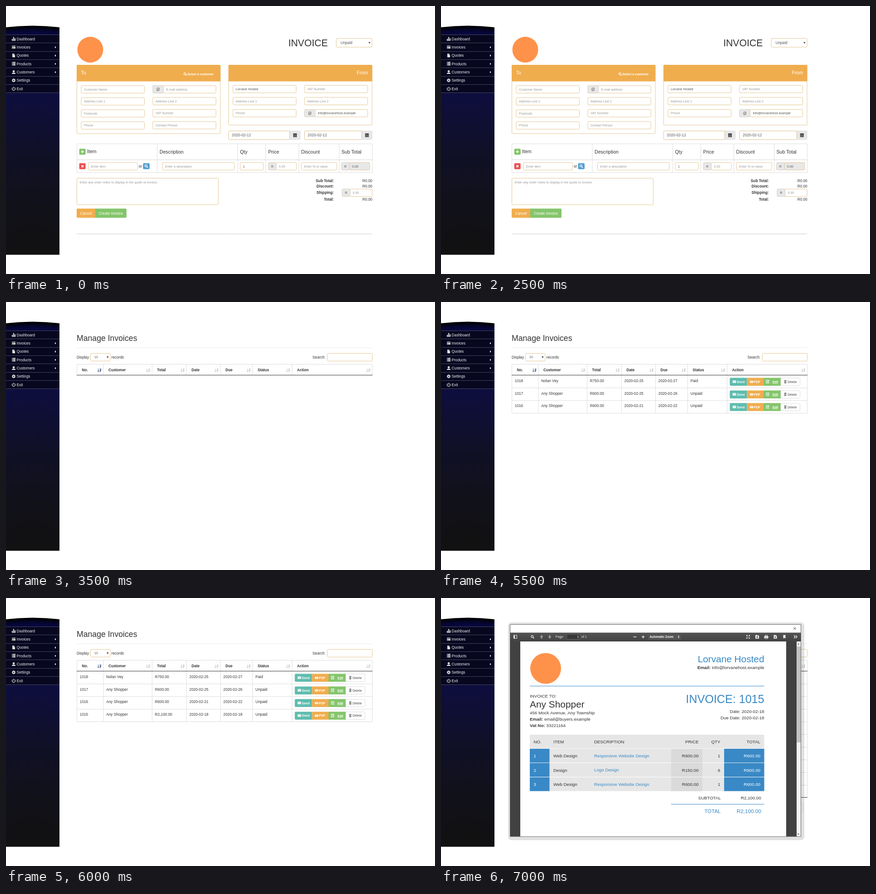
Write an HTML page with a canvas that moves like this. It is 947 px wide and 592 px high and loops after 8 s.

```html
<!DOCTYPE html>
<html lang="en">
<head>
<meta charset="utf-8">
<title>Invoice manager</title>
<style>
html, body { margin: 0; width: 100%; height: 100%; overflow: hidden; background: #fff; }
canvas { display: block; }
</style>
</head>
<body>
<canvas id="stage" width="947" height="592"></canvas>
<script>
const ctx = document.getElementById('stage').getContext('2d');
const LOOP = 8000;
const BODY = 8.24, SMALL = 7.06, HEAD = 10.6, DOC = 9.75;
const BLUE = '#3989c6';
const COMPANY = 'Lorvane Hosted', COMPANY_MAIL = 'info@lorvanehost.example';
const SHOPPER = 'Any Shopper', PERSON = 'Nolan Vey';

const light = {
  page: '#fff', text: '#333', value: '#555', hint: '#999', edge: '#e3c793', line: '#ddd',
  addon: '#e8e8e8', orange: '#f0ad4e', green: '#84c56b', red: '#ec5050', find: '#559fd0',
  logo: '#ff924a', white: '#fff'
};
const dim = {
  page: '#808080', text: '#1a1a1a', value: '#2b2b2b', hint: '#4a4a4a', edge: '#94825c', line: '#6d6d6d',
  addon: '#747474', orange: '#a87833', green: '#5b8a49', red: '#bb3a3a', find: '#2ba9bd',
  logo: '#bd6c3a', white: '#c4c4c4'
};
let pal = light;

function text(s, x, y, size = BODY, color = pal.text, align = 'left', weight = '') {
  ctx.font = `${weight} ${size}px "Liberation Sans", Arial, sans-serif`;
  ctx.fillStyle = color;
  ctx.textAlign = align;
  ctx.fillText(s, x, y + size * 0.355);
}

function rect(x1, y1, x2, y2, color) {
  ctx.fillStyle = color;
  ctx.fillRect(x1, y1, x2 - x1, y2 - y1);
}

function box(x1, y1, x2, y2, fill, edge, r = 2) {
  const inset = edge ? 0.5 : 0;
  ctx.beginPath();
  ctx.roundRect(x1 + inset, y1 + inset, x2 - x1 - 2 * inset, y2 - y1 - 2 * inset, r);
  if (fill) { ctx.fillStyle = fill; ctx.fill(); }
  if (edge) { ctx.strokeStyle = edge; ctx.lineWidth = 1; ctx.stroke(); }
}

function poly(color, ...p) {
  ctx.beginPath();
  for (let i = 0; i < p.length; i += 2) ctx.lineTo(p[i], p[i + 1]);
  ctx.fillStyle = color;
  ctx.fill();
}

function stroke(color, width, ...p) {
  ctx.beginPath();
  for (let i = 0; i < p.length; i += 2) ctx.lineTo(p[i], p[i + 1]);
  ctx.strokeStyle = color;
  ctx.lineWidth = width;
  ctx.stroke();
}

function disc(x, y, r, color) {
  ctx.beginPath();
  ctx.arc(x, y, r, 0, 7);
  ctx.fillStyle = color;
  ctx.fill();
}

function arc(x, y, r, color, width, from = 0, to = 7) {
  ctx.beginPath();
  ctx.arc(x, y, r, from, to);
  ctx.strokeStyle = color;
  ctx.lineWidth = width;
  ctx.stroke();
}

// Icons are drawn around their own centre, about 8 px wide.
const icons = {
  chart(c) { rect(-4, 0, -2, 4, c); rect(-1, -4, 1, 4, c); rect(2, -1, 4, 4, c); rect(-4, 3, 4, 4, c); },
  card(c) { rect(-4, -3, 4, -1.5, c); rect(-4, -0.3, 4, 3, c); rect(-3, 0.8, -1, 1.6, '#222'); },
  file(c) { poly(c, -3, -4, 0.5, -4, 0.5, -1, 3, -1, 3, 4, -3, 4); poly(c, 1, -4, 3, -1.6, 1, -1.6); },
  list(c) { for (let y = -4; y < 4; y += 2.1) { rect(-4, y, -2.8, y + 1.5, c); rect(-2.2, y, 4, y + 1.5, c); } },
  user(c) { disc(0, -1.7, 2.3, c); poly(c, -4, 4, -4, 2.5, -1, 1, 1, 1, 4, 2.5, 4, 4); },
  gear(c) {
    for (let i = 0; i < 8; i++) {
      const a = i * Math.PI / 4;
      stroke(c, 1.7, 2 * Math.cos(a), 2 * Math.sin(a), 4 * Math.cos(a), 4 * Math.sin(a));
    }
    arc(0, 0, 2.2, c, 1.7);
  },
  power(c) { arc(0, 0.3, 3.4, c, 1.2, -0.95, 4.1); stroke(c, 1.3, 0, -4, 0, 0); },
  search(c) { arc(-0.8, -0.8, 2.3, c, 1.3); stroke(c, 1.6, 0.9, 0.9, 3.5, 3.5); },
  calendar(c) {
    rect(-4, -4, 4, 4, c);
    for (let y = -1.6; y < 3; y += 1.9) rect(-3.4, y, 3.4, y + 0.5, pal.addon);
  },
  plus(c) { rect(-3.5, -1, 3.5, 1, c); rect(-1, -3.5, 1, 3.5, c); },
  cross(c) { stroke(c, 1.9, -2.5, -2.5, 2.5, 2.5); stroke(c, 1.9, -2.5, 2.5, 2.5, -2.5); },
  mail(c) { rect(-3.8, -2.8, 3.8, 2.8, c); stroke('#5fbcae', 0.8, -3.8, -2.6, 0, 0.8, 3.8, -2.6); },
  eye(c) {
    ctx.beginPath(); ctx.ellipse(0, 0, 4, 2.6, 0, 0, 7); ctx.fillStyle = c; ctx.fill();
    arc(0, -0.2, 1.6, '#f0ad4e', 0.7);
  },
  edit(c) { stroke(c, 1.1, 1, -3, -3, -3, -3, 3, 3, 3, 3, 0.5); stroke(c, 1.7, -0.8, 0.9, 3.5, -3.2); },
  trash(c) {
    rect(-3, -3.3, 3, -2.2, c); rect(-1, -4, 1, -3.3, c);
    for (const x of [-2.2, -0.5, 1.2]) rect(x, -1.6, x + 1, 3.4, c);
    rect(-2.5, 3, 2.5, 4, c);
  },
  sort(c) {
    rect(-3, -4, -1.8, 3, c); poly(c, -4.6, 1.3, -0.2, 1.3, -2.4, 4);
    rect(0.8, -4, 2, 4, c); rect(2, -4, 4.6, -2.8, c); rect(2, -1.8, 3.8, 0.2, c);
    poly(c, 1, 1, 4.6, -1, 2.6, 3);
  },
  panel(c) { box(-4, -4, 4, 4, null, c, 0); rect(-3, -3, -1, 3, c); },
  up(c) { poly(c, 0, -4, 4, 0, 1.5, 0, 1.5, 4, -1.5, 4, -1.5, 0, -4, 0); },
  down(c) { poly(c, 0, 4, 4, 0, 1.5, 0, 1.5, -4, -1.5, -4, -1.5, 0, -4, 0); },
  expand(c) {
    for (const sx of [-1, 1]) for (const sy of [-1, 1]) {
      poly(c, 4 * sx, 4 * sy, sx, 4 * sy, 4 * sx, sy);
      stroke(c, 1.2, sx, sy, 3 * sx, 3 * sy);
    }
  },
  folder(c) { rect(-4, -4, 0, -2, c); rect(-4, -3, 4, 4, c); poly('#444', 0, -1.5, 2.3, 1, 0.7, 1, 0.7, 3, -0.7, 3, -0.7, 1, -2.3, 1); },
  printer(c) { rect(-4.5, -1.5, 4.5, 3, c); box(-3, -4, 3, 0, null, c, 0); box(-3, 1, 3, 4.5, '#444', c, 0); },
  save(c) { poly(c, -3.5, -4, 1, -4, 3.5, -1.5, 3.5, 4, -3.5, 4); poly('#444', 0, 2.8, -2, 0.6, -0.6, 0.6, -0.6, -1.5, 0.6, -1.5, 0.6, 0.6, 2, 0.6); },
  mark(c) { poly(c, -2.5, -4, 2.5, -4, 2.5, 4, 0, 2, -2.5, 4); }
};

function icon(name, x, y, color, scale = 1) {
  ctx.save();
  ctx.translate(x, y);
  ctx.scale(scale, scale);
  icons[name](color);
  ctx.restore();
}

function sidebar() {
  ctx.save();
  ctx.beginPath();
  ctx.moveTo(0, 47);
  ctx.quadraticCurveTo(59, 40, 118, 47);
  ctx.lineTo(118, 549.5);
  ctx.lineTo(0, 549.5);
  ctx.clip();
  const glow = ctx.createRadialGradient(59, 560, 0, 59, 560, 520);
  [[0, '#111'], [0.1, '#111113'], [0.25, '#11111b'], [0.45, '#101026'], [0.72, '#0e0e40'], [0.95, '#0a0a4c'], [0.975, '#05052c'], [0.99, '#000']]
    .forEach(([at, color]) => glow.addColorStop(at, color));
  rect(0, 40, 118, 550, glow);
  rect(0, 63, 118, 192, '#070720');
  ctx.restore();
  const items = [['chart', 'Dashboard'], ['card', 'Invoices'], ['file', 'Quotes'], ['list', 'Products'],
    ['user', 'Customers'], ['gear', 'Settings'], ['power', 'Exit']];
  items.forEach(([name, label], i) => {
    const y = 72.8 + i * 18.35;
    rect(0, Math.round(y - 9.8), 118, Math.round(y - 9.8) + 1, '#45455c');
    icon(name, 17, y - 0.3, '#e4e4e4');
    text(label, 23.6, y, BODY, '#f2f2f2');
    if (i > 0 && i < 5) poly('#fff', 108, y - 2.4, 110.6, y, 108, y + 2.4);
  });
  rect(0, 191, 118, 192, '#45455c');
}

function field(x1, y1, x2, label, { h = 17.5, size = SMALL, color = pal.hint, fill = pal.page, pad = 6.5 } = {}) {
  box(x1, y1, x2, y1 + h, fill, pal.edge);
  text(label, x1 + pad, y1 + h / 2, size, color);
}

function addonField(x1, split, x2, y, sign, label, options = {}) {
  field(split - 1, y, x2, label, options);
  box(x1, y, split, y + 17.5, pal.addon, pal.line === '#ddd' ? '#d6cdbb' : pal.line);
  text(sign, (x1 + split) / 2, y + 9, sign === '@' ? BODY : SMALL, pal.value, 'center');
}

function select(x1, y1, x2, h, label, size, pad) {
  field(x1, y1, x2, label, { h, size, color: pal.value, pad });
  poly(pal.text, x2 - 8.3, y1 + h / 2 - 1.6, x2 - 4, y1 + h / 2 - 1.6, x2 - 6.1, y1 + h / 2 + 2);
}

function dateField(x1, split, x2) {
  box(x1, 275.5, x2, 295.5, pal.addon, pal.line);
  field(x1, 275.5, split + 0.5, '2020-02-12', { h: 20, size: BODY, color: pal.value, pad: 7.6 });
  icon('calendar', (split + x2) / 2, 285.5, pal.text);
}

function iconButton(name, x, y, w, color) {
  box(x, y, x + w, y + 13.2, color);
  icon(name, x + w / 2, y + 6.6, pal.white, name === 'search' ? 1 : 0.9);
}

function invoiceForm() {
  disc(186, 96.5, 28.5, pal.logo);
  text('INVOICE', 710.3, 81, 21.2, pal.text, 'right');
  select(728.5, 71, 808.5, 20.5, 'Unpaid', BODY, 10);

  box(156, 130, 473.5, 282.5, pal.page, pal.edge);
  box(491, 130, 808.5, 263.5, pal.page, pal.edge);
  box(156, 130, 473.5, 166.5, pal.orange, null, [2, 2, 0, 0]);
  box(491, 130, 808.5, 166.5, pal.orange, null, [2, 2, 0, 0]);
  text('To', 165.6, 147.5, HEAD, pal.white);
  text('From', 799, 147.5, HEAD, pal.white, 'right');
  icon('search', 395.5, 150.5, pal.white, 0.95);
  text('Select a customer', 400.3, 150.8, 6.8, pal.white, 'left', 'bold');

  ['Customer Name', 'Address Line 1', 'Postcode', 'Phone'].forEach((s, i) => field(165.5, 175.4 + i * 26.6, 306, s));
  addonField(323.5, 348, 464, 175.4, '@', 'E-mail address');
  ['Address Line 2', 'VAT Number', 'Contact Person'].forEach((s, i) => field(323.5, 201.5 + i * 26.6, 464, s));
  field(500.5, 174.8, 641, COMPANY, { color: pal.value });
  field(500.5, 201.4, 641, 'Address Line 1');
  field(500.5, 228, 641, 'Phone');
  field(658.5, 174.8, 799, 'VAT Number');
  field(658.5, 201.4, 799, 'Address Line 2');
  addonField(658.5, 683, 799, 228, '@', COMPANY_MAIL, { color: pal.value });

  dateField(491, 626, 650);
  dateField(658.5, 785, 808.5);

  box(156, 304, 809, 368.5, null, pal.line, 0);
  rect(156, 339, 809, 340.3, pal.line);
  [334, 511.5, 573.5, 646.5, 735.5].forEach(x => rect(x - 0.5, 304, x + 0.5, 368, pal.line));
  [['Item', 179, 321], ['Description', 339], ['Qty', 516.5], ['Price', 578.7], ['Discount', 651.5], ['Sub Total', 740.5]]
    .forEach(([s, x, y = 322.5]) => text(s, x, y, HEAD));
  iconButton('plus', 161.7, 315.2, 14, pal.green);
  iconButton('cross', 161.7, 347.2, 14, pal.red);
  iconButton('search', 302.5, 347.2, 14.5, pal.find);
  const y = 345.3;
  field(181.3, y, 291, 'Enter item');
  text('or', 293, 353.7);
  field(345, y, 504.5, 'Enter a description');
  field(516.5, y, 568.8, '1', { color: pal.value });
  addonField(578.7, 597, 641.5, y, 'R', '0.00');
  field(651.5, y, 730.7, 'Enter % or value');
  addonField(740.3, 758.5, 803.5, y, 'R', '0.00', { color: pal.value, fill: pal.addon });

  box(156, 379.8, 469, 439.5, pal.page, pal.edge);
  text('Enter any order notes to display in the quote or invoice.', 162.7, 389, SMALL, pal.hint);

  [['Sub Total:', 386], ['Discount:', 398], ['Shipping:', 412.3], ['Total:', 427.5]].forEach(([s, ty]) => {
    text(s, 723.5, ty, BODY, pal.text, 'right', 'bold');
    if (s !== 'Shipping:') text('R0.00', 808.7, ty, BODY, pal.text, 'right');
  });
  addonField(741.5, 760, 808.8, 403.8, 'R', '0.00');

  box(156, 447.5, 197, 467.8, pal.orange, null, [2, 0, 0, 2]);
  box(197, 447.5, 266, 467.8, pal.green, null, [0, 2, 2, 0]);
  text('Cancel', 176.6, 457.8, BODY, pal.white, 'center');
  text('Create Invoice', 231.2, 457.8, BODY, pal.white, 'center');

  stroke(pal.line === '#ddd' ? '#ccc' : '#666', 1, 156, 501.5, 158, 503.5, 806.5, 503.5, 808.5, 501.5);
}

function customerDialog() {
  box(286, 50.5, 661.5, 287, 'rgba(0,0,0,.07)', null, 12);
  ctx.save();
  ctx.shadowColor = 'rgba(0,0,0,.5)';
  ctx.shadowBlur = 9;
  ctx.shadowOffsetY = 3;
  box(296, 58, 651, 273.5, '#fff', null, 3);
  ctx.restore();
  box(296, 58, 651, 273.5, null, '#666', 3);
  text('Select a customer', 305.5, 74.7, HEAD);
  text('×', 638, 73, 12.4, '#bbb', 'center', 'bold');
  rect(297, 91, 650, 92, '#e5e5e5');
  rect(297, 235, 650, 236, '#e5e5e5');
  text('Search:', 537.5, 109.3, BODY, pal.text, 'right');
  field(542, 100.5, 642, '', { h: 18 });

  box(305, 125, 642, 206, null, pal.line, 0);
  rect(422, 125, 423, 206, pal.line);
  rect(537, 125, 538, 206, pal.line);
  rect(305, 177.5, 642, 178.5, pal.line);
  rect(305, 149, 642, 150, '#222');
  rect(305, 205, 642, 206, '#222');
  [['Name', 316.8, 414], ['Contact', 433.8, 528.5], ['Action', 548, 632.5]].forEach(([s, x, sx], i) => {
    text(s, x, 137.7, BODY, pal.text, 'left', 'bold');
    icon('sort', sx, 138.5, i === 1 ? '#55708c' : '#ccc');
  });
  [SHOPPER, PERSON].forEach((name, i) => {
    const y = 161 + i * 28;
    text(name, 311.8, y);
    box(543.3, y - 6, 635, y + 12, pal.orange);
    text('Select', 589.2, y + 3, SMALL, '#fff', 'center', 'bold');
  });
  text('Showing 1 to 2 of 2 entries', 305.3, 220.5);
  box(600, 244.5, 641.7, 264.8, '#ddd');
  text('Cancel', 621, 254.8, BODY, pal.text, 'center');
}

const columns = [156.5, 215, 322.5, 398.5, 473.5, 544.5, 631.5, 808.5];
const invoices = [
  ['1018', PERSON, 'R750.00', '2020-02-25', '2020-02-27', 'Paid'],
  ['1017', SHOPPER, 'R600.00', '2020-02-25', '2020-02-26', 'Unpaid'],
  ['1016', SHOPPER, 'R600.00', '2020-02-21', '2020-02-22', 'Unpaid'],
  ['1015', SHOPPER, 'R2,100.00', '2020-02-18', '2020-02-18', 'Unpaid'],
  ['1014', PERSON, 'R1,200.00', '2020-02-17', '2020-02-12', 'Unpaid']
];

function invoiceRow(cells, y) {
  columns.forEach(x => rect(x - 0.5, y, x + 0.5, y + 28, pal.line));
  rect(156, y + 27.3, 809, y + 28.3, pal.line);
  cells.forEach((s, i) => text(s, columns[i] + 6.3, y + 11.7));
  const top = y + 5.5, bottom = y + 23, mid = y + 14.2;
  box(637.5, top, 675.5, bottom, '#5fbcae', null, [2, 0, 0, 2]);
  rect(675.5, top, 712, bottom, pal.orange);
  rect(712, top, 750, bottom, pal.green);
  box(749.5, top, 793, bottom, '#fff', '#ddd');
  icon('mail', 647.5, mid - 0.3, '#fff');
  text('Send', 653, mid, SMALL, '#fff', 'left', 'bold');
  icon('eye', 685.5, mid, '#fff');
  text('PDF', 690.8, mid, SMALL, '#fff', 'left', 'bold');
  icon('edit', 721, mid - 0.3, '#fff');
  text('Edit', 731.8, mid + 0.6, 6.6, '#fff', 'left', 'bold');
  rect(731.8, mid + 3.7, 744, mid + 4.3, '#fff');
  icon('trash', 760, mid - 0.3, '#555', 0.9);
  text('Delete', 765, mid, SMALL, '#444');
}

function invoiceList(count) {
  text('Manage Invoices', 156, 79.3, 17.66);
  rect(156, 100.5, 808.5, 101.5, '#e9e9e9');
  text('Display', 156, 121.7);
  select(186, 113, 230.5, 17.8, '10', SMALL, 9);
  text('records', 232.7, 121.7);
  text('Search:', 705, 121.7, BODY, pal.text, 'right');
  field(709, 113, 809, '', { h: 18 });
  rect(156, 137, 809, 138, pal.line);
  columns.forEach(x => rect(x - 0.5, 137, x + 0.5, 162, pal.line));
  ['No.', 'Customer', 'Total', 'Date', 'Due', 'Status', 'Action'].forEach((s, i) => {
    text(s, columns[i] + 11, 150, BODY, pal.text, 'left', 'bold');
    icon('sort', columns[i + 1] - 8.8, 151, i ? '#ccc' : '#55708c');
  });
  invoices.slice(0, count).forEach((cells, i) => invoiceRow(cells, 162 + i * 27.9));
  rect(156, 161, 809, 162, '#333');
}

function labelled(label, value, x, y) {
  text(label, x, y, DOC, pal.text, 'left', 'bold');
  text(value, x + ctx.measureText(label + ' ').width, y, DOC);
}

function pdfPage() {
  disc(231, 155.5, 34, pal.logo);
  text(COMPANY, 713.5, 135, 20.8, BLUE, 'right');
  text(COMPANY_MAIL, 713.5, 154, DOC, pal.text, 'right');
  const mailWidth = ctx.measureText(COMPANY_MAIL + ' ').width;
  text('Email:', 713.5 - mailWidth, 154, DOC, pal.text, 'right', 'bold');
  rect(196, 194, 713.5, 195, BLUE);

  text('INVOICE TO:', 196, 216.3, DOC);
  text(SHOPPER, 196, 235, 20.9);
  text('456 Mock Avenue, Any Township', 196, 253.3, DOC);
  labelled('Email:', 'email@buyers.example', 196, 267.3);
  labelled('Vat No:', '33221164', 196, 281.3);
  text('INVOICE: 1015', 713.5, 222.8, 25.1, BLUE, 'right');
  text('Date: 2020-02-18', 713.5, 250.6, DOC, pal.text, 'right');
  text('Due Date: 2020-02-18', 713.5, 264.6, DOC, pal.text, 'right');

  rect(196, 302, 713.5, 332.3, '#e6e6e6');
  const edges = [204.5, 248, 338, 568.7, 616.5, 705];
  const cell = (s, i, y, color) => text(s, edges[i], y, DOC, color, i > 2 ? 'right' : 'left');
  ['NO.', 'ITEM', 'DESCRIPTION', 'PRICE', 'QTY', 'TOTAL'].forEach((s, i) => cell(s, i, 317.5));
  const site = ['Web Design', 'Responsive Website Design', 'R600.00', '1', 'R600.00'];
  [site, ['Design', 'Logo Design', 'R150.00', '6', 'R900.00'], site].forEach((cells, n) => {
    const y = 333 + n * 31.5;
    rect(196, y, 713.5, y + 30.5, '#e6e6e6');
    rect(196, y, 239.5, y + 30.5, BLUE);
    rect(508, y, 577, y + 30.5, '#dadada');
    rect(625, y, 713.5, y + 30.5, BLUE);
    [String(n + 1), ...cells].forEach((s, i) =>
      cell(s, i, y + (i === 2 ? 15.4 : 16), i === 0 || i === 5 ? '#fff' : i === 2 ? BLUE : pal.text));
  });
  text('SUBTOTAL', 617.5, 441.2, 9.6, pal.text, 'right');
  text('R2,100.00', 706.7, 441.2, DOC, pal.text, 'right');
  rect(508, 455, 713.5, 456, BLUE);
  text('TOTAL', 617.5, 471, 11.5, BLUE, 'right');
  text('R2,100.00', 706.7, 471, 11.7, BLUE, 'right');
}

function pdfViewer() {
  // The rest of the list shows past the window's right edge.
  for (let y = 329; y < 440; y += 28) rect(790, y, 809, y + 1, pal.line);
  rect(808, 162, 809, 440, pal.line);
  rect(790, 440, 809, 441, '#333');
  box(780, 453, 800, 473, '#fff', pal.line);
  box(148, 54, 802, 535, 'rgba(0,0,0,.12)', null, 8);

  rect(152, 58, 795, 527.5, '#fff');
  stroke('#333', 1, 778.3, 64.8, 783.3, 69.8);
  stroke('#333', 1, 778.3, 69.8, 783.3, 64.8);
  const bar = ctx.createLinearGradient(0, 76.5, 0, 96);
  bar.addColorStop(0, '#545454');
  bar.addColorStop(1, '#424242');
  rect(152, 76.5, 795, 96, bar);
  rect(152, 96, 785, 527, '#414141');
  rect(175, 96, 762, 527, '#fff');
  rect(785, 96, 795, 527, '#f1f1f1');
  rect(785.5, 107, 794, 319, '#c1c1c1');
  poly('#444', 787, 102.5, 791, 102.5, 789, 100);
  poly('#444', 787, 520.5, 791, 520.5, 789, 523);

  const y = 85.8;
  [['panel', 164], ['search', 202], ['up', 222], ['down', 240], ['expand', 678], ['folder', 698],
    ['printer', 718], ['save', 738], ['mark', 758]]
    .forEach(([name, x]) => icon(name, x, y, name === 'up' || name === 'down' ? '#999' : '#eee'));
  text('Page:', 252.8, y - 0.5, SMALL, '#eee');
  box(277, 79.5, 307.5, 91.8, '#383838', '#666', 1);
  text('1', 304.5, y, SMALL, '#fff', 'right');
  text('of 1', 310, y - 0.5, SMALL, '#eee');
  rect(424.5, 85.2, 431.5, 86.6, '#eee');
  rect(443, 85.2, 449.5, 86.6, '#eee');
  rect(445.6, 82.7, 447, 89.1, '#eee');
  box(457, 79.5, 530, 92, '#555');
  text('Automatic Zoom', 460.5, y - 0.4, 6.7, '#fff', 'left', 'bold');
  poly('#fff', 522.7, 85, 526.3, 85, 524.5, 82.7);
  poly('#fff', 522.7, 86.5, 526.3, 86.5, 524.5, 88.8);
  for (const x of [779, 783]) stroke('#eee', 1.4, x, 82.5, x + 3, y, x, 89);

  pdfPage();
  box(152, 58, 795, 527.5, null, '#666', 0);
}

function draw(t) {
  pal = light;
  rect(0, 0, 947, 592, '#fff');
  const dialog = t >= 500 && t < 2500;
  ctx.save();
  if (dialog) {
    rect(118, 41, 947, 550, dim.page);
    rect(118, 549.5, 947, 550.5, '#5b4a52');
    ctx.translate(0, 1);
  }
  sidebar();
  if (t < 3500) {
    if (dialog) pal = dim;
    invoiceForm();
  } else {
    invoiceList(Math.max(0, Math.min(5, Math.floor((t - 4000) / 500))));
  }
  ctx.restore();
  pal = light;
  if (dialog) customerDialog();
  if (t >= 7000) pdfViewer();
}

const start = performance.now();
function tick() {
  draw((performance.now() - start) % LOOP);
  requestAnimationFrame(tick);
}
tick();
</script>
</body>
</html>
```
